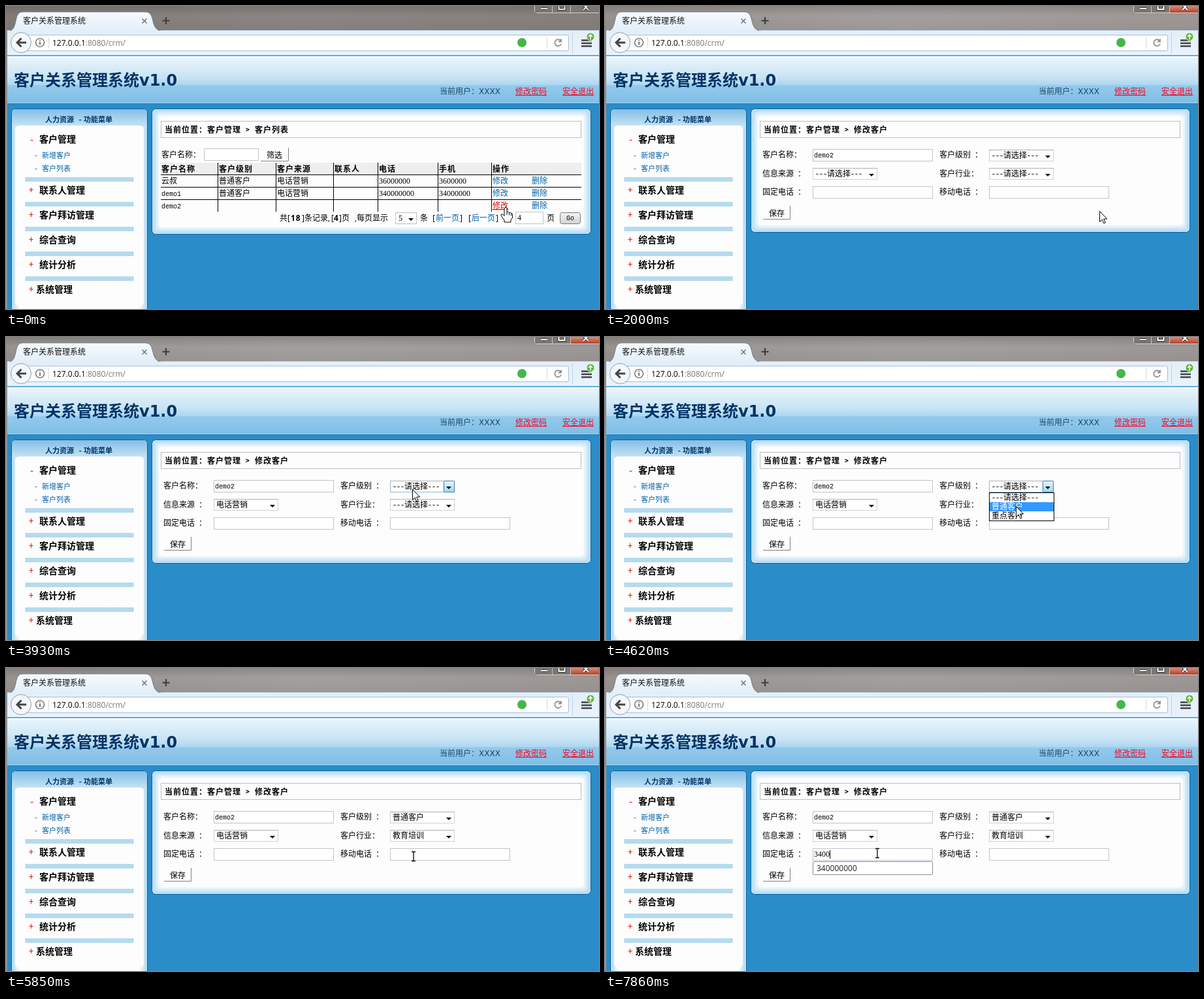
An HTML page for the animation above (8000 ms loop, 908 by 464 pixels).

```html
<!DOCTYPE html>
<html lang="zh-CN">
<head>
<meta charset="utf-8">
<title>客户关系管理系统</title>
<style>
  html, body { margin: 0; width: 100%; height: 100%; overflow: hidden; background: #2a8cc8; }
  svg { display: block; width: 908px; height: 464px; }
  text { font: 12px "Noto Sans Mono CJK SC", "Noto Sans CJK SC", "Noto Sans CJK", monospace; white-space: pre; }
  .b { font-weight: bold; letter-spacing: 1px; }
  .sign { font-size: 14px; }
  .menu { font-size: 14px; font-weight: bold; }
  .small { font-size: 11px; }
  .caption { font-size: 11px; font-weight: bold; }
  .ui { font-family: "Open Sans", "Noto Sans CJK SC", "Noto Sans CJK", sans-serif; }
  .user { font-family: "DejaVu Sans", "Noto Sans CJK SC", "Noto Sans CJK", sans-serif; }
  .title { font: bold 24px "DejaVu Sans", "Noto Sans CJK SC", "Noto Sans CJK", sans-serif; }
  .num { font: 12px "Liberation Serif", serif; }
  .mono { font: 10px "Liberation Mono", monospace; }
  .u { text-decoration: underline; }
</style>
</head>
<body>
<svg viewBox="0 0 908 464" xmlns="http://www.w3.org/2000/svg">
  <defs>
    <linearGradient id="glass"><stop stop-color="#98928e"/><stop offset=".5" stop-color="#a3a09f"/><stop offset="1" stop-color="#9d9895"/></linearGradient>
    <linearGradient id="shade" x2="0" y2="1"><stop stop-color="#000" stop-opacity=".14"/><stop offset=".4" stop-color="#000" stop-opacity="0"/><stop offset="1" stop-color="#000" stop-opacity=".05"/></linearGradient>
    <linearGradient id="tab" x2="0" y2="1"><stop stop-color="#f6fafd"/><stop offset="1" stop-color="#e2eef9"/></linearGradient>
    <linearGradient id="bar" x2="0" y2="1"><stop stop-color="#e2eef9"/><stop offset="1" stop-color="#eaf3fb"/></linearGradient>
    <linearGradient id="head" x2="0" y2="1"><stop stop-color="#eaf5fb"/><stop offset=".16" stop-color="#dceef8"/><stop offset=".42" stop-color="#c9e4f5"/><stop offset=".6" stop-color="#acd6f0"/><stop offset=".61" stop-color="#93c9eb"/><stop offset="1" stop-color="#7fbee6"/></linearGradient>
    <linearGradient id="side" x2="0" y2="1"><stop stop-color="#82bfe5"/><stop offset="1" stop-color="#c6e3f5"/></linearGradient>
    <linearGradient id="hot" x2="0" y2="1"><stop stop-color="#e6f5fd"/><stop offset=".5" stop-color="#c5e6f8"/><stop offset="1" stop-color="#9fd4f2"/></linearGradient>
    <linearGradient id="btn" x2="0" y2="1"><stop stop-color="#f4f4f4"/><stop offset="1" stop-color="#d2d2d2"/></linearGradient>
    <linearGradient id="red" x2="0" y2="1"><stop stop-color="#d88a78"/><stop offset="1" stop-color="#b8402a"/></linearGradient>
    <pattern id="stripe" width="2" height="8" patternUnits="userSpaceOnUse"><rect width="1" height="8" fill="#6cb8de"/></pattern>
  </defs>
  <g id="stage"></g>
</svg>
<script>
const LOOP = 8000;
const CLICK = 1430, LOADED = 1570, FOCUS = 6820;
const LINK = '#0061a8', NAVY = '#003366', RED = '#ff0020', GREY = '#b9bfc5';

// Bursts of screen updates: start, end, count
const RUNS = [[1430, 2420, 8], [2550, 3380, 7], [3630, 4620, 8], [4780, 5690, 8], [5850, 6820, 8], [7280, 7860, 5]];
// Pointer path: time, x, y
const PATH = [
  [0, 765, 308], [1430, 765, 308], [1570, 757, 314], [2000, 757, 314], [2420, 506, 300], [2690, 400, 263],
  [2970, 373, 258], [3240, 373, 277], [3380, 368, 287], [3630, 368, 287], [3910, 622, 233],
  [4200, 622, 233], [4620, 629, 259], [4780, 629, 259], [5040, 632, 262], [5300, 632, 262],
  [5690, 624, 288], [5850, 624, 288], [6400, 417, 283], [LOOP, 417, 283]
];
const NONE = '---请选择---';
const SELECTS = [
  { x: 588, y: 220, open: 4200, pick: 4780, items: [NONE, '普通客户', '重点客户'] },
  { x: 318, y: 248, open: 2970, pick: 3630, items: [NONE, '电话营销', '网络营销', '推广活动'] },
  { x: 588, y: 248, open: 5300, pick: 5850, items: [NONE, '教育培训', '金融保险', '电子商务', '医疗卫生', '交通运输'] }
];
const INPUTS = [[318, 219], [318, 276], [588, 276]];
const HISTORY = ['340000000', '36000000', '3600000'];

const rect = (x, y, w, h, fill, stroke = 'none', r = 0) =>
  `<rect x="${x}" y="${y}" width="${w}" height="${h}" rx="${r}" fill="${fill}" stroke="${stroke}"/>`;
const box = (x, y, w, h, fill, stroke, r) => rect(x + .5, y + .5, w - 1, h - 1, fill, stroke, r);
const path = (d, fill = 'none', stroke = 'none', w = 1) =>
  `<path d="${d}" fill="${fill}" stroke="${stroke}" stroke-width="${w}"/>`;
const circle = (x, y, r, fill, stroke = 'none', w = 1) =>
  `<circle cx="${x}" cy="${y}" r="${r}" fill="${fill}" stroke="${stroke}" stroke-width="${w}"/>`;
const text = (x, y, s, fill = '#000', cls = '') => `<text x="${x}" y="${y}" fill="${fill}" class="${cls}">${s}</text>`;
const input = (x, y, w = 184, h = 19) => box(x, y, w, h, '#fff', '#bfc4c9');
const arrow = (x, y) => path(`M${x - 4} ${y - 2}h8l-4 4z`, '#000');
const inside = (p, x, y, w, h) => p.x >= x && p.x < x + w && p.y >= y && p.y < y + h;
const isOpen = (f, s) => s >= f.open && s < f.pick;

// White card with a pale blue glow along its edge
function panel(x, y, w, h) {
  let s = box(x, y, w, h, '#cfe8f7', '#0b5f9e', 6);
  for (let i = 2; i < 13; i++) {
    const k = (i - 2) / 10, mix = (a, b) => Math.round(a + (b - a) * k);
    s += rect(x + i, y + i, w - 2 * i, h - 2 * i, `rgb(${mix(180, 253)},${mix(220, 253)},${mix(244, 254)})`, 'none', 6);
  }
  return s;
}

function button(x, y, w, label) {
  return rect(x, y, w, 21, '#fdfdfd') + path(`M${x} ${y + 20.5}h${w - .5}v-20.5`, 'none', '#808080') +
    text(x + 9, y + 16, label);
}

function titleBar(active) {
  const icons = 'M819 4h10M846.5 0v5h9v-5M884 6l8-8m-8 0l8 8';
  return rect(0, 0, 908, 38, 'url(#glass)') + rect(0, 0, 908, 38, 'url(#shade)') +
    (active ? '' : rect(0, 0, 908, 38, 'rgba(40,32,26,.2)')) +
    path('M809.5 0v6q0 4.500 4 4.500h95', 'none', '#d6d2cf') + rect(810, 0, 54, 10, '#7b7671', 'none', 2) +
    rect(865, 0, 43, 10, active ? 'url(#red)' : '#7b7671') +
    path('M836.5 0v10M864.5 0v10', 'none', '#c9c5c1') +
    path(icons, 'none', '#3a3a3a', 4) + path(icons, 'none', active ? '#fff' : '#e4e4e4', 2);
}

function toolbar() {
  return rect(0, 37, 908, 40, 'url(#bar)') + path('M2 37.5H908', 'none', '#c4d5e4') +
    path('M2 39C12 38 13 31 15 23C17 13 19 9 26 9H213C221 9 223 14 225 23C227 32 230 37 238 38.5z', 'url(#tab)', '#6d7a86') +
    rect(2, 38, 240, 3, '#e2eef9') +
    text(26, 27, '客户关系管理系统', '#111', 'ui') +
    path('M208.5 19.5l7 7m0-7l-7 7', 'none', '#777', 1.6) +
    path('M239.5 22.5h11m-5.5-5.5v11', 'none', '#3d3d3d', 2.2) +
    box(26, 44, 836, 25, '#fff', '#a9bed1', 2) +
    circle(23, 56, 15.5, '#f4f8fc', '#8a9eb0') +
    path('M31 56H17m6.5-6.5L17 56l6.5 6.5', 'none', '#454545', 3) +
    circle(52, 56, 6.5, '#fff', '#555', 1.2) + path('M52 54.5v5M52 51.5v1.6', 'none', '#555', 1.6) +
    path('M65.5 48v17M828.5 48v17', 'none', '#d5d9dd') +
    `<text x="71" y="61" class="ui" fill="#000">127.0.0.1<tspan fill="#777">:8080/crm/</tspan></text>` +
    circle(790, 56, 7, '#45b649') +
    path('M849.5 53.5A5 5 0 1 0 850 58M850 50.5v4h-4', 'none', '#909090', 1.8) +
    path('M867.5 41v32', 'none', '#c3d3e1') +
    path('M881 52.5h16m-16 4.5h16m-16 4.5h16', 'none', '#444', 2.6) +
    circle(895, 47, 6, '#5ab52a', '#eef6fb') + path('M895 51v-7m-3 3l3-3l3 3', 'none', '#fff', 1.6);
}

function header() {
  return rect(0, 77, 908, 387, '#2a8cc8') +
    rect(2, 75, 906, 2, '#58afe0') + rect(2, 77, 906, 2, '#fff') + rect(2, 79, 906, 70, 'url(#head)') +
    rect(2, 148, 906, 1, '#a9d5f0') + rect(2, 149, 906, 1, '#2278b2') +
    text(12, 122, '客户关系管理系统v1.0', NAVY, 'title') +
    text(664, 135, '当前用户：XXXX', '#1c4566', 'user') +
    text(780, 135, '修改密码', RED, 'ui u') + text(852, 135, '安全退出', RED, 'ui u') +
    rect(0, 37, 2, 427, '#8f9396');
}

function sidebar() {
  const items = ['联系人管理', '客户拜访管理', '综合查询', '统计分析', '系统管理'];
  return panel(8, 157, 209, 320) + rect(9, 158, 207, 26, 'url(#side)', 'none', 5) +
    rect(14, 183, 197, 276, '#fdfdfe', 'none', 6) +
    text(60, 178, '人力资源', NAVY, 'caption') + text(111, 178, '-', NAVY, 'caption') +
    text(119, 178, '功能菜单', NAVY, 'caption') +
    text(36, 209, '-', '#e00000', 'sign') + text(51, 209, '客户管理', '#000', 'menu') +
    ['新增客户', '客户列表'].map((s, i) =>
      text(43, 233 + 20 * i, '-', LINK, 'small') + text(55, 233 + 20 * i, s, LINK, 'small')).join('') +
    items.map((s, i) => {
      const y = 262 + 38 * i;
      return rect(30, y, 165, 7, 'url(#stripe)') + text(35, y + 25, '+', '#e02000', 'sign') +
        text(i < 4 ? 51 : 46, y + 25, s, '#000', 'menu');
    }).join('');
}

function crumbs(name) {
  return box(237, 176, 644, 26, '#fdfdfe', GREY) + text(243, 194, '当前位置：客户管理 &gt; ' + name, '#000', 'b');
}

function listPage() {
  const cols = [238, 326, 415, 503, 571, 663, 745];
  const heads = ['客户名称', '客户级别', '客户来源', '联系人', '电话', '手机', '操作'];
  const rows = [
    ['云叔', '普通客户', '电话营销', '', '36000000', '3600000'],
    ['demo1', '普通客户', '电话营销', '', '340000000', '34000000'],
    ['demo2']
  ];
  const font = s => /^\d/.test(s) ? 'num' : /^\w/.test(s) ? 'mono' : '';
  const pager = [[419, '共'], [431, '['], [453, ']条记录,'], [498, '['], [510, ']'], [514, '页'], [534, ',每页显示'],
    [634, '条'], [653, '['], [695, ']'], [708, '['], [750, ']'], [828, '页']];
  return panel(223, 157, 673, 193) + crumbs('客户列表') +
    text(238, 232, '客户名称：') + input(303, 218, 84) + button(390, 217, 43, '筛选') +
    rect(237, 240, 644, 18, '#eee') +
    path('M237 258.5h644M237 277.5h644M237 296.5h644', 'none', '#000') +
    cols.slice(1).map(x => path(`M${x - 1.5} 240v75`, 'none', '#000')).join('') +
    heads.map((s, i) => text(cols[i], 254, s, '#000', 'b')).join('') +
    rows.map((r, j) => {
      const y = 272 + 19 * j;
      return r.map((s, i) => text(cols[i], y, s, '#000', font(s))).join('') +
        text(745, y, '修改', j < 2 ? LINK : '#e00000', j < 2 ? '' : 'u') + text(805, y, '删除', LINK);
    }).join('') +
    pager.map(([x, s]) => text(x, 329, s, '#000', 'ui')).join('') +
    text(436, 329, '18', '#000', 'b ui') + text(502, 329, '4', '#000', 'b ui') +
    text(658, 329, '前一页', LINK) + text(713, 329, '后一页', LINK) +
    box(596, 316, 33, 18, '#fff', GREY) + text(601, 329, '5', '#000', 'num') + arrow(620, 327) +
    input(780, 315, 43) + text(783, 328, '4', '#000', 'num') +
    box(848, 316, 32, 18, 'url(#btn)', '#777', 3) + text(858, 328, 'Go', '#000', 'mono');
}

function select(f, s, p) {
  const { x, y, items } = f;
  const hot = isOpen(f, s) || inside(p, x, y, 99, 18);
  return box(x, y, 99, 18, '#fff', hot ? '#8fb9d6' : '#cdd1d5') + path(`M${x} ${y + .5}h99`, 'none', '#abb1b7') +
    (hot ? box(x + 82, y, 17, 18, 'url(#hot)', '#3c7fb1', 1) : '') +
    text(x + 4, y + 13, s >= f.pick ? items[1] : items[0]) + arrow(x + 90, y + 11);
}

function dropdown({ x, y, items }, p) {
  const top = y + 19, at = Math.floor((p.y - top) / 14);
  const sel = at >= 0 && at < items.length ? at : 0;
  return box(x, top - 1, 100, items.length * 14 + 2, '#fff', '#000') + rect(x + 1, top + 14 * sel, 98, 14, '#3399ff') +
    items.map((s, i) => text(x + 4, top + 11 + 14 * i, s, i === sel ? '#fff' : '#000')).join('');
}

function typing(s) {
  if (s < FOCUS) return '';
  const n = s < 7280 ? 0 : s < 7500 ? 1 : s < 7700 ? 2 : s < 7800 ? 3 : 4;
  const typed = HISTORY[0].slice(0, n), x = 320.5 + 6 * n;
  const hits = s < 7400 ? [] : HISTORY.filter(h => h.startsWith(typed));
  return text(320, 289, typed, '#000', 'num') + path(`M${x} 279v13`, 'none', '#000') +
    (hits.length ? box(318, 296, 184, 20 * hits.length + 1, '#fff', '#8a8a8a', 1) : '') +
    hits.map((h, i) => text(324, 311 + 20 * i, h, '#222', 'ui')).join('');
}

function formPage(s, p) {
  const labels = [[241, 232, '客户名称：'], [512, 232, '客户级别 ：'], [241, 261, '信息来源 ：'],
    [512, 261, '客户行业：'], [241, 289, '固定电话 ：'], [512, 289, '移动电话 ：']];
  const open = SELECTS.find(f => isOpen(f, s));
  return panel(223, 157, 673, 190) + crumbs('修改客户') +
    labels.map(([x, y, l]) => text(x, y, l)).join('') +
    INPUTS.map(([x, y]) => input(x, y)).join('') + text(320, 232, 'demo2', '#000', 'mono') +
    SELECTS.map(f => select(f, s, p)).join('') + button(242, 306, 42, '保存') +
    typing(s) + (open ? dropdown(open, p) : '');
}

function pointer(s, p) {
  const open = SELECTS.some(f => isOpen(f, s));
  let shape;
  if (s < LOADED) {
    shape = path('M-2 1.5Q0-1 2 1.5V8Q4 6 5.5 8.5Q7.5 7 8.5 9.5Q10 8.5 10.5 11V16L8 20V23H-2V20L-7 13Q-7.5 10 -4.5 11L-2 13.5z', '#fff', '#000') +
      path('M2 8v4M5.5 9v3.5M8.5 10v3', 'none', '#000');
  } else if (!open && INPUTS.some(([x, y]) => inside(p, x, y, 184, 19))) {
    shape = path('M-3-6.5h2.5l.5.5l.5-.5h2.5M0-6V7M-3 7.5h2.5l.5-.5l.5.5h2.5', 'none', '#000', 1.3);
  } else {
    shape = path('M.5.5V16.5L4.2 13L6.8 18.8L9.2 17.8L6.7 12H11.7z', '#fff', '#000');
  }
  return `<g transform="translate(${p.x} ${p.y})">${shape}</g>`;
}

// Time of the latest screen update
function snap(t) {
  let last = 0;
  for (const [a, b, n] of RUNS)
    for (let k = 0; k < n; k++) {
      const at = Math.round((a + k * (b - a) / (n - 1)) / 10) * 10;
      if (at <= t) last = at;
    }
  return last;
}

function pointerAt(s) {
  const i = PATH.findIndex(k => k[0] > s);
  const [t0, x0, y0] = PATH[i - 1], [t1, x1, y1] = PATH[i];
  const u = (s - t0) / (t1 - t0);
  return { x: Math.round(x0 + (x1 - x0) * u), y: Math.round(y0 + (y1 - y0) * u) };
}

const stage = document.getElementById('stage');
const fixed = toolbar() + header() + sidebar();

let shown = -1;
function render(t) {
  const s = snap(t);
  if (s === shown) return;
  shown = s;
  const p = pointerAt(s);
  stage.innerHTML = titleBar(s >= CLICK) + fixed + (s < LOADED ? listPage() : formPage(s, p)) + pointer(s, p);
}

const start = performance.now();
function tick() {
  render((performance.now() - start) % LOOP);
  requestAnimationFrame(tick);
}
tick();
</script>
</body>
</html>
```
